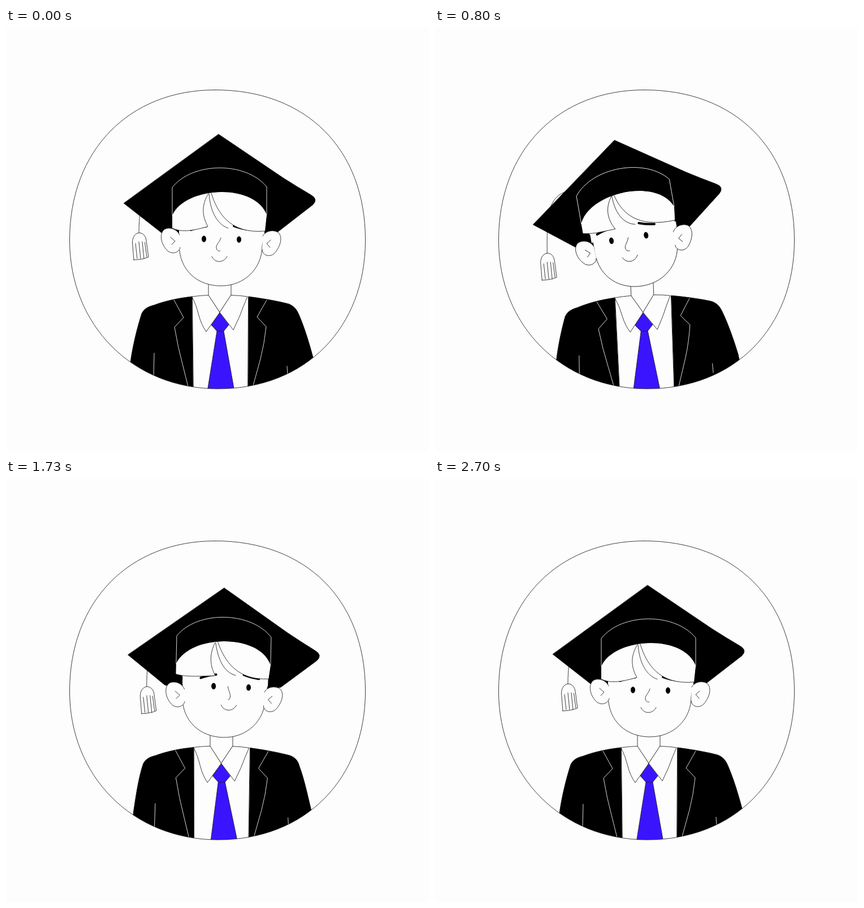
Recreate the animation shown at these times as an HTML page with a canvas. Size 748 px wide and 748 px high, loop 2.73 s.

```html
<!DOCTYPE html>
<html lang="en">
<head>
<meta charset="utf-8">
<title>Graduate</title>
<style>
  html, body { margin: 0; width: 100%; height: 100%; overflow: hidden; background: #fdfdfd; }
  canvas { display: block; }
</style>
</head>
<body>
<canvas id="stage" width="748" height="748"></canvas>
<script>
const ctx = document.getElementById('stage').getContext('2d');
const LOOP = 2730;
const PAPER = '#fdfdfd', INK = '#000', LINE = '#1c1c1c', BLUE = '#3b14ff';
const CHIN = [379, 456], HIP = [378, 634];

// Offsets are relative to the resting pose; angles in degrees.
const rest = {
  a: 0, x: 0, y: 0, bandX: 0, bandY: 0, faceX: 0, faceY: 0, jaw: 0,
  earLX: 0, earLY: 0, earRX: 0, earRY: 0, brow: 0, nose: 1, lift: 0,
  tasX: 28, tasY: 53, bodyA: 0, bodyX: 0, tie: 0, arm: 0
};
const left = {
  ...rest, a: -10, x: -12, y: 6, bandX: -3, bandY: -8, faceX: -12, faceY: -9, jaw: -6,
  earRX: -4, earRY: -2, brow: 0.5, lift: -5, tasX: 26, tasY: 51,
  bodyA: -2.2, bodyX: -5, tie: -6
};
const right = {
  a: 2, x: 5.6, y: 5.9, bandX: 0, bandY: -10, faceX: 14.4, faceY: -14, jaw: -5,
  earLX: 3, earLY: 3, earRX: -4, earRY: 3, brow: 2.5, nose: -1, lift: -5,
  tasX: 36, tasY: 58, bodyA: 0.8, bodyX: 2, tie: 8.5, arm: 5
};
const back = {
  ...rest, a: -1.2, x: -1.4, y: 1, lift: -1.5, tasX: 29,
  bodyA: -0.3, bodyX: -1, tie: -3, arm: -1.5
};

// The second turn settles later for the face, nose and tassel.
const turns = settle => [
  [0, rest], [315, left], [800, left], [settle, right], [1630, right],
  [1960, back], [1985, back], [2280, rest], [LOOP, rest]
];
const headTrack = turns(1100), faceTrack = turns(1190), lateTrack = turns(1290);
const blinkTrack = [
  [0, 1], [60, 1], [150, 0], [190, 0], [300, 1], [880, 1], [980, 0], [1020, 0],
  [1120, 1], [1840, 1], [1930, 0], [1990, 0], [2100, 1], [LOOP, 1]
];
const swingTrack = [[0, 0], [800, 0], [950, 13], [1070, 9], [1230, 0], [LOOP, 0]];

const mix = (a, b, p) => a + (b - a) * p;
const smooth = u => u * u * (3 - 2 * u);

function segment(track, t) {
  let i = 1;
  while (i < track.length - 1 && t >= track[i][0]) i++;
  const [t0, from] = track[i - 1], [t1, to] = track[i];
  return [from, to, smooth((t - t0) / (t1 - t0))];
}
const valueAt = (track, t) => mix(...segment(track, t));

function poseAt(t) {
  const pose = {};
  const take = (track, keys) => {
    const [from, to, p] = segment(track, t);
    for (const k of keys) pose[k] = mix(from[k], to[k], p);
  };
  take(headTrack, Object.keys(rest));
  take(faceTrack, ['faceX', 'faceY']);
  take(lateTrack, ['nose', 'tasX', 'tasY']);
  pose.open = valueAt(blinkTrack, t);
  pose.swing = valueAt(swingTrack, t);
  return pose;
}

function draw(d, fill, stroke, width = 0.85) {
  const path = new Path2D(d);
  if (fill) { ctx.fillStyle = fill; ctx.fill(path); }
  if (stroke) { ctx.strokeStyle = stroke; ctx.lineWidth = width; ctx.stroke(path); }
}

function place([px, py], dx, dy, deg, paint) {
  ctx.save();
  ctx.translate(px + dx, py + dy);
  ctx.rotate(deg * Math.PI / 180);
  ctx.translate(-px, -py);
  paint();
  ctx.restore();
}

const RING = 'M370,109.5 C531,109.5 635.5,214 635.5,375 C635.5,530 530,638 375,638' +
  ' C224,638 112.5,526 112.5,375 C112.5,217 217,109.5 370,109.5 Z';
const ringPath = new Path2D(RING);

function drawBody(s) {
  const l = s.arm, r = s.arm * 1.5, tie = s.tie - s.bodyX;
  draw(`M329,475 C300,478 278,484 262,490 C250,493 244,497 240,505
    C232,530 ${224 + l},562 ${220 + l},592 L${213 + l},650 L331,650 Z`, INK, INK);
  draw(`M429,475 C460,479 485,484 500,488 C510,492 514,498 ${518 - r * 0.3},507
    C${528 - r * 0.5},530 ${537 - r},560 ${543 - r},583 L${555 - r},650 L428,650 Z`, INK, INK);
  draw('M297,481 L314,512 L298,529 Q304,565 313,598 L323,638', null, PAPER);
  draw('M461,481 L444,511 L460,528 Q457,558 450,585 L436,636', null, PAPER);
  draw('M262,575 L261,616 M497,598 L498,614', null, PAPER);
  // Neck, collar and tie
  draw('M358,440 L358,473 L378,503 L398,473 L398,440', PAPER, LINE);
  draw(`M373,536 L${355.7 + tie},645 L${404.4 + tie},645 L385,536 Z`, BLUE, LINE);
  draw('M378,503 L363,525 L373,536 L385,536 L394,525 Z', BLUE, LINE);
  draw('M329,475 Q344,473 358,472.5 L378,503 L354,537 Q345,524 341,508 Q337,491 329,475 Z', PAPER, LINE);
  draw('M398,472.5 Q415,473 427,475 Q420,491 413,510 L402,534 L378,503 Z', PAPER, LINE);
}

function onBoard(s, x, y) {
  const r = s.a * Math.PI / 180, dx = x - CHIN[0], dy = y - CHIN[1];
  return [
    CHIN[0] + s.x + dx * Math.cos(r) - dy * Math.sin(r),
    CHIN[1] + s.y + dx * Math.sin(r) + dy * Math.cos(r)
  ];
}

function drawTassel(s) {
  const [cx, cy] = onBoard(s, 208, 310);
  const [ax, ay] = onBoard(s, 282, 262);
  const x = cx + s.tasX - s.swing * 0.45, y = cy + s.tasY;
  draw(`M${ax},${ay} C${ax - 34 + s.a * 0.8},${ay + 8} ${x - 1},${y - 59} ${x - 1},${y}`, null, LINE);
  place([x, y], 0, 0, s.swing, () => {
    ctx.translate(x, y);
    draw('M-10,47 L-12.5,16 C-12,-5 9,-6 12,12 L16,42 Q4,47 -10,47 Z', PAPER, LINE);
    draw('M-7,18 L-4,45 M-1,15 L2,45 M5,15 L8,45 M9.5,16 L13,42', null, LINE);
  });
}

function drawEye(x, y, open) {
  if (open < 0.15) {
    draw(`M${x - 4},${y} Q${x},${y + 7} ${x + 4},${y}`, null, INK, 1.3);
    return;
  }
  ctx.fillStyle = INK;
  ctx.beginPath();
  ctx.ellipse(x, y + (1 - open), 4, 5.8 * open, 0, 0, Math.PI * 2);
  ctx.fill();
}

function drawFace(s) {
  const n = s.nose, nx = k => 377 + k * n;
  const b = s.brow + (1 - s.open) * 3;
  draw(`M327,${357 + b} Q340,${352 + b} 354,${350.5 + b}`, null, INK, 4);
  draw(`M403,${350 + b} Q417,${355 + b} 430,${356.5 + b}`, null, INK, 4);
  drawEye(350, 373, s.open);
  drawEye(412, 374, s.open);
  // Nose and mouth rise less than the eyes
  ctx.translate(0, -s.faceY * 0.18);
  draw(`M${nx(3)},371 C${nx(1)},379 ${nx(-6)},383 ${nx(-5)},389
    C${nx(-4)},395 ${nx(1)},395 ${nx(2)},394`, null, LINE);
  draw('M364,404 C369,416 385,416 391,404', null, LINE);
}

const BROW_ARC = 'M294,331 C318,279 440,274 461,330';

function drawHair(s) {
  const k = (s.faceX - s.bandX) * 0.6, up = s.lift, bend = up * 1.6;
  const root = 358 + k * 0.6;
  const lock = `${root},293 C${347 + k},310 ${345 + k},330 ${357 + k},351
    C${325 + k / 2},${360 + bend} 310,${361 + bend} 294,${354 + up}`;
  const sweep = `458,${359 + up} C${395 + k},${365 + bend} ${373 + k},325 ${root + 5},292`;
  draw(`${BROW_ARC} L${sweep} L${lock} Z`, PAPER);
  draw(`M${lock} M${sweep}`, null, LINE);
  draw(`M${root + 1},293 C${361 + k},322 ${372 + k},${347 + up / 2} ${393 + k},${354 + up}`, null, LINE);
}

function drawHead(s) {
  const part = (dx, dy, paint) => place(CHIN, s.x + dx, s.y + dy, s.a, paint);

  part(0, 0, () => draw(`M376,188 L490,265 Q515,281 539,295 Q553,303 542,313
    L480,361 L456,367 L310,367 L275,362 L208.5,310 Z`, INK, INK));
  part(0, s.jaw, () => draw(`M306,354 L306,382 C306,430 340,456 380,456
    C422,456 453,425 453,385 L457,362 L457,354`, PAPER, LINE));
  part(s.bandX, s.bandY, () => draw(`${BROW_ARC} L457,358 L457,368 L306,368 L306,354 Z`, PAPER));
  part(s.faceX, s.faceY, () => drawFace(s));
  part(s.bandX, s.bandY, () => {
    drawHair(s);
    draw('M294,331 L294,282 C330,236 425,236 461,281 L461,330 C440,274 318,279 294,331 Z', INK);
    draw('M294,331 L294,282 C330,236 425,236 461,281 L461,330', null, PAPER);
  });
  part(s.earLX, s.earLY, () => {
    draw('M307,366 C302,354 286,351 279,357 C270,366 275,385 287,395 C296,401 307,396 308,388', PAPER, LINE);
    draw('M291,370 L299,377 L293,383', null, LINE);
  });
  part(s.earRX, s.earRY, () => {
    draw('M454,368 C459,358 474,356 482,362 C491,372 483,390 474,399 C466,406 453,402 453,392', PAPER, LINE);
    draw('M468,375 L461,381 L467,388', null, LINE);
  });
}

function render(t) {
  const s = poseAt(t);
  ctx.fillStyle = PAPER;
  ctx.fillRect(0, 0, 748, 748);
  ctx.lineCap = 'round';
  ctx.lineJoin = 'round';
  ctx.save();
  ctx.clip(ringPath);
  place(HIP, s.bodyX, 0, s.bodyA, () => drawBody(s));
  ctx.restore();
  draw(RING, null, LINE);
  drawTassel(s);
  drawHead(s);
}

const start = performance.now();
function tick() {
  render((performance.now() - start) % LOOP);
  requestAnimationFrame(tick);
}
tick();
</script>
</body>
</html>
```
